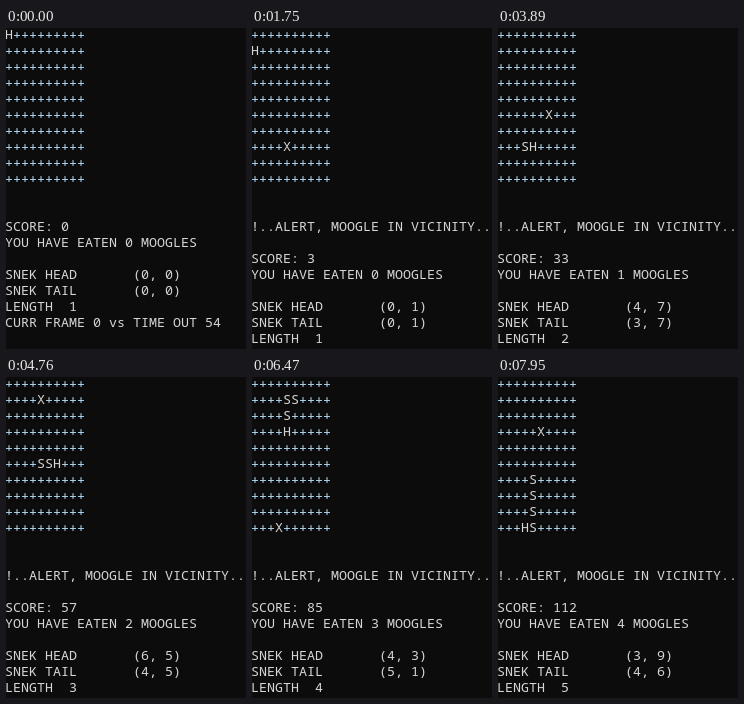
An HTML page with a canvas that plays this animation: 240 px wide and 321 px high, repeating every 8 s.

```html
<!DOCTYPE html>
<html lang="en">
<head>
<meta charset="utf-8">
<title>Snek</title>
<style>
html, body { margin: 0; width: 100%; height: 100%; overflow: hidden; background: #0c0c0c; }
canvas { display: block; }
</style>
</head>
<body>
<canvas id="stage" width="240" height="321"></canvas>
<script>
const ctx = document.getElementById("stage").getContext("2d");
const LOOP = 8000, START = 1270, TICK = 215.4, TICKS = 32, BLANK = 50;
const SIZE = 10, CELL = 8, LINE = 16;
const SPAWN = 2; // tick on which the first moogle appears
const moogles = [[4, 7], [6, 5], [4, 1], [3, 9], [5, 3]];

// The snek walks to the moogle, vertically first, and grows when it eats
function simulate() {
  let snek = [[0, 0]], eaten = 0;
  return Array.from({ length: TICKS + 1 }, (_, n) => {
    if (n > SPAWN) {
      const [x, y] = snek[0], [mx, my] = moogles[eaten];
      const head = y !== my ? [x, y + Math.sign(my - y)] : [x + Math.sign(mx - x), y];
      const ate = head[0] === mx && head[1] === my;
      snek = [head, ...(ate ? snek : snek.slice(0, -1))];
      if (ate) eaten++;
    }
    return { n, snek, eaten, moogle: n >= SPAWN ? moogles[eaten] : null };
  });
}

function screen({ n, snek, eaten, moogle }) {
  const grid = Array.from({ length: SIZE }, () => Array(SIZE).fill("+"));
  const put = ([x, y], c) => { grid[y][x] = c; };
  const pair = p => `(${p.join(", ")})`;
  if (moogle) put(moogle, "X");
  snek.forEach((p, i) => put(p, i ? "S" : "H"));
  return [
    ...grid.map(row => row.join("")),
    "", "",
    ...(moogle ? ["!..ALERT, MOOGLE IN VICINITY..!", ""] : []),
    `SCORE: ${n + 20 * eaten}`,
    `YOU HAVE EATEN ${eaten} MOOGLES`,
    "",
    "SNEK HEAD".padEnd(16) + pair(snek[0]),
    "SNEK TAIL".padEnd(16) + pair(snek[snek.length - 1]),
    `LENGTH  ${snek.length}`,
    `CURR FRAME ${n} vs TIME OUT 54`
  ];
}

const screens = simulate().map(screen);

// The cleared console shows on every fifth tick, early on twice in five
function isBlank(n, sinceTick) {
  const phase = n % 5;
  return sinceTick < BLANK && (phase === 1 || (phase === 2 && n < 10));
}

function draw(now) {
  const t = now % LOOP;
  const n = t < START ? 0 : Math.min(TICKS, 1 + Math.floor((t - START) / TICK));
  ctx.fillStyle = "#0c0c0c";
  ctx.fillRect(0, 0, 240, 321);
  if (!isBlank(n, t - START - (n - 1) * TICK)) {
    ctx.font = '500 13.333px "Noto Sans Mono", "DejaVu Sans Mono", monospace';
    screens[n].forEach((line, row) => {
      [...line].forEach((c, col) => {
        const plus = c === "+";
        ctx.fillStyle = plus ? "#b8e0fa" : "#d6d6d6";
        ctx.fillText(c, col * CELL - 1, row * LINE + (plus ? 12 : 11));
      });
    });
  }
  requestAnimationFrame(draw);
}
requestAnimationFrame(draw);
</script>
</body>
</html>
```
